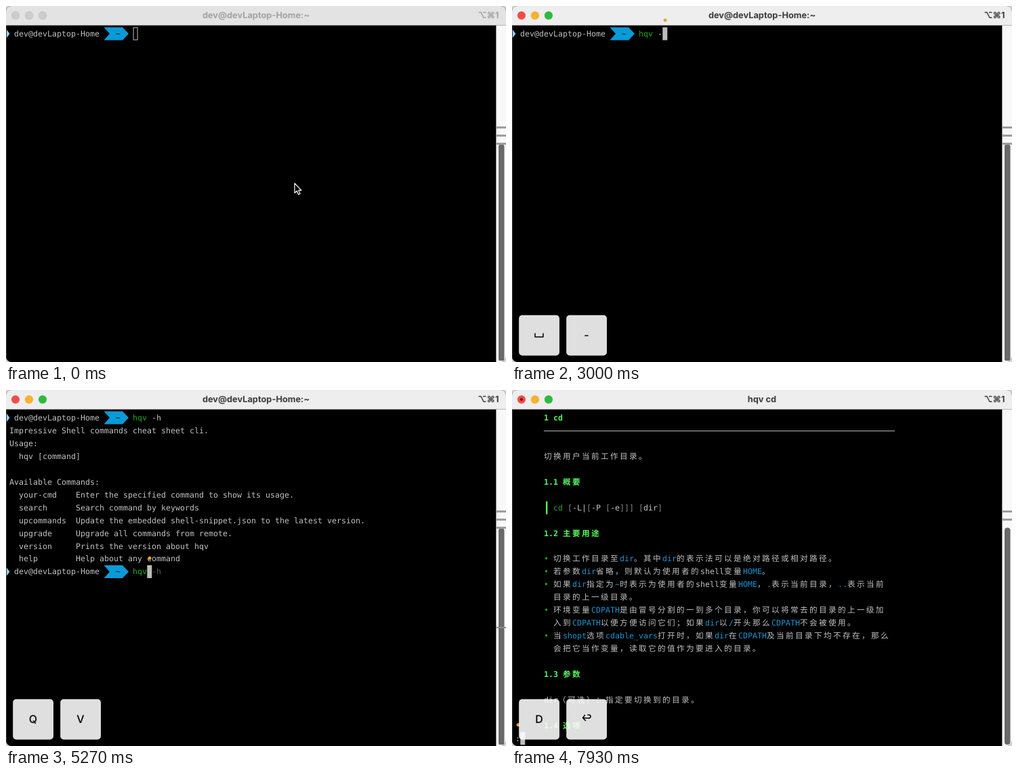
These frames come from a looping animation (738 px wide and 526 px high, 8000 ms). An HTML page:

```html
<!DOCTYPE html>
<html lang="zh-CN">
<head>
<meta charset="utf-8">
<title>Terminal</title>
<style>
  html, body { margin: 0; width: 100%; height: 100%; overflow: hidden; background: #d4d4d4; }
  svg { display: block; width: 738px; height: 526px; }
  text { white-space: pre; text-rendering: geometricPrecision; }
  .mono { font: 11.63px "DejaVu Sans Mono", monospace; }
  .cjk { font: 11.63px "Noto Sans CJK SC", "Noto Sans CJK", sans-serif; letter-spacing: 2.37px; text-spacing-trim: space-all; }
  .bold { font-weight: 700; }
  .ui { font: 700 12.8px Inter, sans-serif; }
  .key { font: 500 16px Inter, sans-serif; text-anchor: middle; }
</style>
</head>
<body>
<svg id="stage" viewBox="0 0 738 526" xmlns="http://www.w3.org/2000/svg"></svg>
<script>
const LOOP = 8000, CELL = 7, PITCH = 18.95;
const USER = 'dev@devLaptop-Home', CMD = 'hqv';
const C = { text: '#c0c0c0', dim: '#858585', ghost: '#5a5a5a', green: '#25a525', bright: '#5af75a',
            blue: '#1e93cf', prompt: '#0a9bd7', cursor: '#bcbcbc' };
const stage = document.getElementById('stage');

function add(parent, tag, attrs = {}, content) {
  const node = document.createElementNS('http://www.w3.org/2000/svg', tag);
  for (const name in attrs) node.setAttribute(name, attrs[name]);
  if (content !== undefined) node.textContent = content;
  parent.append(node);
  return node;
}
const rect = (p, x, y, width, height, fill, more) => add(p, 'rect', { x, y, width, height, fill, ...more });
const colX = col => 5 + col * CELL;
const rowY = row => 41 + row * PITCH;

// Writes one run on the cell grid and returns the column after it.
function write(p, col, row, string, fill = C.text, bold = false) {
  for (const part of string.match(/[\u2e80-\uffff]+|[^\u2e80-\uffff]+/g) || []) {
    const wide = part.charCodeAt(0) >= 0x2e80;
    add(p, 'text', { x: colX(col), y: rowY(row) + 4, fill,
      class: (wide ? 'cjk' : 'mono') + (bold ? ' bold' : '') }, part);
    col += part.length * (wide ? 2 : 1);
  }
  return col;
}

// Backticks switch between plain text and blue code.
function writeMarked(p, col, row, string) {
  string.split('`').forEach((part, i) => { col = write(p, col, row, part, i % 2 ? C.blue : C.text); });
}

function cursor(p, col, row, char = '', hollow = false) {
  const x = colX(col) + .3, y = rowY(row) - 9.5;
  if (hollow) rect(p, x + .8, y + .5, 6, 18, 'none', { stroke: C.cursor });
  else rect(p, x, y, 7, 19, C.cursor);
  write(p, col, row, char, '#777');
}

function prompt(p, row, typed, ghost) {
  const y = rowY(row);
  add(p, 'path', { d: `M1 ${y - 6}L5.5 ${y}L1 ${y + 6}Z`, fill: '#8fcdf3' });
  write(p, 1, row, USER);
  add(p, 'path', { d: `M144.5 ${y - 9.5}H172L181 ${y}L172 ${y + 9.5}H144.5L153 ${y}Z`, fill: C.prompt });
  write(p, 22.4, row, '~', '#06202e');
  const col = write(p, 26, row, typed.slice(0, 3), C.green);
  const end = write(p, col, row, typed.slice(3));
  if (ghost) write(p, end, row, ghost, C.ghost);
}

const HELP = [
  'Impressive Shell commands cheat sheet cli.', 'Usage:', `  ${CMD} [command]`, '', 'Available Commands:',
  '  your-cmd    Enter the specified command to show its usage.',
  '  search      Search command by keywords',
  '  upcommands  Update the embedded shell-snippet.json to the latest version.',
  '  upgrade     Upgrade all commands from remote.',
  `  version     Prints the version about ${CMD}`,
  '  help        Help about any command'
];
const HEADINGS = { 0: '1 cd', 5: '1.1 概要', 9: '1.2 主要用途', 20: '1.3 参数', 24: '1.4 选项' };
const BULLETS = [
  '•切换工作目录至`dir`。其中`dir`的表示法可以是绝对路径或相对路径。',
  '•若参数`dir`省略，则默认为使用者的shell变量`HOME`。',
  '•如果`dir`指定为`~`时表示为使用者的shell变量`HOME`，`.`表示当前目录，`..`表示当前',
  '目录的上一级目录。',
  '•环境变量`CDPATH`是由冒号分割的一到多个目录，你可以将常去的目录的上一级加',
  '入到`CDPATH`以便方便访问它们；如果`dir`以`/`开头那么`CDPATH`不会被使用。',
  '•当`shopt`选项`cdable_vars`打开时，如果`dir`在`CDPATH`及当前目录下均不存在，那么',
  '会把它当作变量，读取它的值作为要进入的目录。'
];

function manual(p) {
  for (const row in HEADINGS) write(p, 6, +row, HEADINGS[row], C.bright, true);
  rect(p, 47, 60, 518, 1, '#b4b4b4');
  write(p, 6, 3, '切换用户当前工作目录。');
  rect(p, 50, 164.5, 2.4, 19, C.bright);
  let col = write(p, 8, 7, 'cd ', C.green);
  for (const part of '[-L|[-P [-e]]] [dir]'.match(/[\[\]]+|[^\[\]]+/g))
    col = write(p, col, 7, part, /[\[\]]/.test(part) ? C.dim : C.text);
  BULLETS.forEach((line, i) => {
    if (line[0] === '•') write(p, 6, 11 + i, '•', C.green);
    writeMarked(p, 8, 11 + i, line.replace('•', ''));
  });
  write(p, 6, 22, 'dir（可选）：指定要切换到的目录。');
  write(p, 0, 25, ':');
  cursor(p, 1, 25);
}

function terminal(p, s) {
  if (s.view === 'manual') return manual(p);
  const [first, second] = s.view === 'help' ? [CMD + ' -h', s.typed] : [s.typed];
  prompt(p, 0, first, second === undefined ? s.ghost : '');
  let row = 0;
  if (second !== undefined) {
    HELP.forEach((line, i) => write(p, 0, i + 1, line));
    row = 12;
    prompt(p, row, second, s.ghost);
  }
  if (s.entered) cursor(p, 0, row + 1);
  else cursor(p, 26 + s.typed.length, row, s.ghost[0], !s.active);
}

function titleBar(p, s) {
  rect(p, 0, 0, 738, 28.6, s.active ? '#eeeeee' : '#e3e3e3');
  ['#fc4b46', '#fdb22b', '#28bd3b'].forEach((color, i) => {
    add(p, 'circle', { cx: 14 + 20 * i, cy: 14, r: 6, fill: s.active ? color : '#cccccc',
      stroke: '#000', 'stroke-opacity': .1, 'stroke-width': .7 });
  });
  const open = s.view === 'manual';
  if (open) add(p, 'circle', { cx: 14, cy: 14, r: 2.2, fill: '#79150f' });
  const fill = s.active ? '#3c3c3c' : '#a2a2a2';
  add(p, 'text', { x: 369, y: 18, class: 'ui', fill, 'text-anchor': 'middle' }, open ? CMD + ' cd' : USER + ':~');
  add(p, 'text', { x: 727.5, y: 17.5, class: 'ui', fill, 'text-anchor': 'end' }, '⌥⌘1');
}

function scrollBar(p, s) {
  const open = s.view === 'manual';
  rect(p, 723.4, 28.6, 15, 498, '#f8f8f8');
  for (const y of open ? [178, 190] : [178, 190, 202]) rect(p, 723.4, y, 15, 3, '#9d9d9d');
  const top = open ? 203.5 : 205;
  rect(p, 727, top, 8.5, 524 - top, '#696969', { rx: open ? 4 : 2 });
  if (s.view === 'help') rect(p, 723.4, 350, 15, 2, '#8c8c8c');
}

const SIGNS = {
  enter: 'M37.5 480.5L34.5 484.5L38.5 488.5M35 484.8H43Q46 484.8 46 482.4T43.4 480H42',
  space: 'M34 484V489H46V484'
};
function keyCaps(p, keys) {
  keys.forEach((key, i) => {
    const g = add(p, 'g', { transform: `translate(${i * 70} 0)` });
    rect(g, 10.2, 456.8, 59.8, 59.6, '#fff', { rx: 5, 'fill-opacity': .875 });
    if (SIGNS[key]) add(g, 'path', { d: SIGNS[key], fill: 'none', stroke: '#000', 'stroke-width': 1.5,
      'stroke-linecap': 'round', 'stroke-linejoin': 'round' });
    else add(g, 'text', { x: 40, y: 492, class: 'key' }, key);
  });
}

const [K1, K2, K3] = CMD.toUpperCase();
const type = (typed, ghost, keys, dot) => ({ typed, ghost, keys, dot });
const EVENTS = [
  [0, { active: false, pointer: true, view: 'shell', entered: false, ...type('', '', [], null) }],
  [600, { active: true }],
  [1000, { dot: [25, 0] }],
  [1670, { pointer: false, ...type(CMD[0], CMD.slice(1) + ' cd', [K1], [27, 0]) }],
  [2200, type(CMD.slice(0, 2), CMD[2] + ' cd', [K1, K2], [28, 0])],
  [2330, type(CMD, ' cd', [K2, K3], [29, 0])],
  [2530, type(CMD + ' ', 'cd', [K3, 'space'], [30, 0])],
  [2870, type(CMD + ' -', '', ['space', '-'], [31, 0])],
  [3130, { typed: CMD + ' -h', keys: ['-', 'H'] }],
  [3400, { entered: true, keys: ['enter'] }],
  [3600, { view: 'help', entered: false, typed: '' }],
  [4930, type(CMD[0], CMD.slice(1) + ' -h', ['enter', K1], [27, 12])],
  [5130, type(CMD.slice(0, 2), CMD[2] + ' -h', [K1, K2], [28, 12])],
  [5265, type(CMD, ' -h', [K2, K3], [29, 12])],
  [5800, type(CMD + ' ', '-h', [K3, 'space'], [30, 12])],
  [6270, type(CMD + ' c', 'd', ['space', 'C'], [31, 12])],
  [6870, { typed: CMD + ' cd', ghost: '', keys: ['C', 'D'] }],
  [7270, { entered: true, keys: ['D', 'enter'] }],
  [7600, { view: 'manual', dot: [0, 25] }]
];

const defs = add(stage, 'defs');
rect(add(defs, 'clipPath', { id: 'window' }), 0, 0, 738, 526, '#000', { rx: 8 });
const win = add(stage, 'g', { 'clip-path': 'url(#window)' });
const badge = rect(stage, 183, 11, 12, 11, '#dedede', { rx: 2 });
const arrow = add(stage, 'path', { d: 'M0 0V14.2L3.3 11.2L5.6 16.5L8 15.4L5.7 10.3H10Z',
  fill: '#000', stroke: '#fff', 'stroke-width': 1.2, 'stroke-linejoin': 'round' });
const beam = add(stage, 'g', { fill: 'none', 'stroke-linecap': 'round' });
for (const [stroke, width] of [['#ddd', 3.2], ['#000', 1.2]])
  add(beam, 'path', { d: 'M-3.5 -7Q0 -7 0 -4Q0 -7 3.5 -7M0 -4V4M-3.5 7Q0 7 0 4Q0 7 3.5 7M-1.8 1H1.8', stroke, 'stroke-width': width });

function drawWindow(s) {
  win.replaceChildren();
  rect(win, 0, 0, 738, 526, '#000');
  rect(win, 0, 29, .7, 497, '#555');
  terminal(win, s);
  titleBar(win, s);
  scrollBar(win, s);
  if (s.dot) add(win, 'circle', { cx: colX(s.dot[0] + .5) + .6, cy: rowY(s.dot[1]) - 20, r: 2.5, fill: '#e3a52f' });
  keyCaps(win, s.keys);
}

let shown = 0;
function render(time) {
  const past = EVENTS.filter(([start]) => start <= time);
  const s = Object.assign({}, ...past.map(event => event[1]));
  if (past.length !== shown) {
    drawWindow(s);
    shown = past.length;
  }
  const move = Math.min(1, Math.max(0, (time - 70) / 530));
  const x = 426 - 8.5 * move * move * (3 - 2 * move);
  arrow.setAttribute('transform', `translate(${x} 262)`);
  beam.setAttribute('transform', `translate(${x} 262.5)`);
  arrow.setAttribute('opacity', s.pointer && !s.active ? 1 : 0);
  beam.setAttribute('opacity', s.pointer && s.active ? 1 : 0);
  badge.setAttribute('opacity', time >= 1000 && time < 1500 ? Math.min(1, (1500 - time) / 400) : 0);
}

const begin = performance.now();
function tick() {
  render((performance.now() - begin) % LOOP);
  requestAnimationFrame(tick);
}
tick();
</script>
</body>
</html>
```
